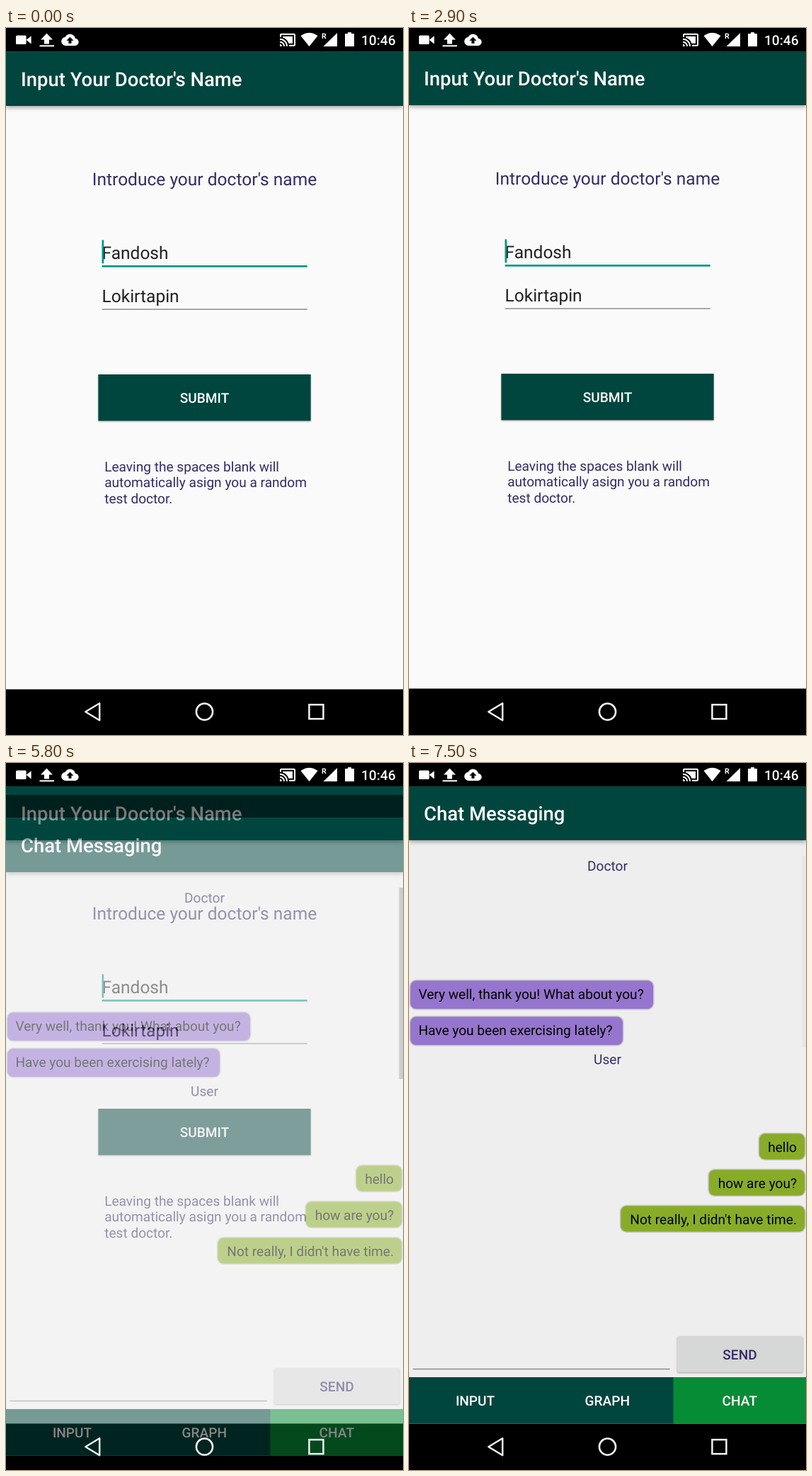
An HTML page for the animation above (8 s loop, 561 by 998 pixels).

```html
<!DOCTYPE html>
<html lang="en">
<head>
<meta charset="utf-8">
<title>Doctor chat</title>
<style>
html, body { margin: 0; height: 100%; overflow: hidden; background: #000; }
svg { display: block; width: 561px; height: 998px; font: 19.1px Roboto, sans-serif; text-rendering: geometricPrecision; }
text { white-space: pre; }
.title { font-size: 27.45px; font-weight: 500; fill: #fff; }
.big { font-size: 24.54px; }
.ink { fill: #352c64; }
.mid { text-anchor: middle; }
.end { text-anchor: end; }
.caps { font-weight: 500; text-anchor: middle; }
.white { fill: #fff; }
.teal { fill: #00453e; }
.bar { filter: drop-shadow(0 2px 3px rgba(0,0,0,.38)); }
.raised { filter: drop-shadow(0 1.5px 1.3px rgba(0,0,0,.32)); }
.pressed { filter: drop-shadow(0 3px 3px rgba(0,0,0,.42)); }
.bubble { stroke: #c6c6c6; stroke-width: 1.5; }
.line { fill: #878787; }
</style>
</head>
<body>
<svg viewBox="0 0 561 998">
  <rect width="561" height="998"/>

  <g id="form">
    <rect width="561" height="998"/>
    <rect y="32.7" width="561" height="899.8" fill="#fafafa"/>
    <rect class="teal bar" y="32.7" width="561" height="76.3"/>
    <text class="title" x="21" y="81">Input Your Doctor's Name</text>
    <text class="big ink mid" x="280.5" y="221">Introduce your doctor's name</text>
    <g class="big" fill="#212121">
      <text x="135.5" y="324.5">Fandosh</text>
      <text x="135.5" y="385.8">Lokirtapin</text>
    </g>
    <rect x="135.7" y="334" width="290" height="2.7" fill="#009688"/>
    <rect class="line" x="135.7" y="395.4" width="290" height="1.4"/>
    <rect id="cursor" x="135.5" y="298.3" width="2.7" height="33" fill="#009688"/>
    <rect id="submit" class="teal raised" x="130.4" y="488" width="300.2" height="65.5"/>
    <text class="caps white" x="280.5" y="528">SUBMIT</text>
    <g class="ink">
      <text x="139.2" y="625">Leaving the spaces blank will</text>
      <text x="139.2" y="647.3">automatically asign you a random</text>
      <text x="139.2" y="669.6">test doctor.</text>
    </g>
  </g>

  <g id="chat">
    <rect width="561" height="998"/>
    <rect y="32.7" width="561" height="899.8" fill="#eee"/>
    <rect class="teal bar" y="32.7" width="561" height="76.3"/>
    <text class="title" x="21" y="81">Chat Messaging</text>
    <text class="ink mid" x="280.5" y="152">Doctor</text>
    <text class="ink mid" x="280.5" y="425">User</text>
    <g class="bubble" fill="#9575cd">
      <rect x="1.2" y="306.5" width="344.6" height="41.3" rx="9"/>
      <rect x="1.2" y="357.5" width="301.6" height="41.3" rx="9"/>
    </g>
    <text x="13.4" y="333">Very well, thank you! What about you?</text>
    <text x="13.4" y="384">Have you been exercising lately?</text>
    <g class="bubble" fill="#88ac28">
      <rect x="494.2" y="522.5" width="65.8" height="37.8" rx="9"/>
      <rect x="423" y="573.5" width="137" height="37.8" rx="9"/>
      <rect x="298.5" y="624.5" width="261.5" height="37.8" rx="9"/>
    </g>
    <g class="end">
      <text x="548" y="549">hello</text>
      <text x="548" y="600">how are you?</text>
      <text x="548" y="651">Not really, I didn't have time.</text>
    </g>
    <rect id="scroll" x="555.5" y="131" width="5.5" height="270" fill-opacity=".31"/>
    <rect class="line" x="5.4" y="854.8" width="363.3" height="1.4"/>
    <rect class="raised" x="379" y="809" width="177.5" height="51" rx="2.5" fill="#d6d7d7"/>
    <text class="caps ink" x="467.5" y="841.5">SEND</text>
    <rect class="teal" y="867" width="374" height="65.5"/>
    <rect x="373.5" y="867" width="187.5" height="65.5" fill="#078c36"/>
    <g class="caps white">
      <text x="93.5" y="907">INPUT</text>
      <text x="280.3" y="907">GRAPH</text>
      <text x="467.3" y="907">CHAT</text>
    </g>
  </g>

  <!-- system bars -->
  <rect width="561" height="32.7"/>
  <g fill="#fff">
    <rect x="14" y="10.6" width="14.6" height="12.4" rx="1.6"/>
    <path d="M35.6 11.2v11.2l-7-5.6z"/>
    <path d="M57.5 7.5l8.5 9h-5v6h-7v-6h-5zM47.5 24.3h20.5v2h-20.5z"/>
    <path transform="translate(78.2 4.5) scale(1.02)" d="M19.35 10.04A7.49 7.49 0 0 0 12 4C9.11 4 6.6 5.64 5.35 8.04A6 6 0 0 0 0 14c0 3.31 2.69 6 6 6h13c2.76 0 5-2.24 5-5 0-2.64-2.05-4.78-4.65-4.96zM14 13v4h-4v-4H7l5-5 5 5z"/>
    <path transform="translate(386 4.7)" d="M1 18v3h3c0-1.66-1.34-3-3-3zm0-4v2c2.76 0 5 2.24 5 5h2c0-3.87-3.13-7-7-7zm18-7H5v1.63c3.96 1.28 7.09 4.41 8.37 8.37H19zM1 10v2c4.97 0 9 4.03 9 9h2c0-6.08-4.93-11-11-11zm20-7H3c-1.1 0-2 .9-2 2v3h2V5h18v14h-7v2h7c1.1 0 2-.9 2-2V5c0-1.1-.9-2-2-2z"/>
    <path d="M428.5 26L416.5 11Q428.5 2.5 440.5 11z"/>
    <path d="M448.5 26H468V7z"/>
    <path d="M479 8h4v-2h5v2h4v18h-13z"/>
    <text x="446" y="15.3" font-size="10.5" font-weight="700">R</text>
    <text class="end" x="550.5" y="24" font-weight="500">10:46</text>
  </g>
  <g fill="none" stroke="#f2f2f2" stroke-width="2.5">
    <path d="M132.2 953.3v23.9L112.3 965.2z" stroke-linejoin="round"/>
    <circle cx="280.5" cy="965.2" r="11.6"/>
    <rect x="428.4" y="955.2" width="20" height="20"/>
  </g>
</svg>
<script>
const LOOP = 8000, STEP = 100, PRESS = 5700, OPEN = 5766, FADE = 7275;
const [form, chat, cursor, submit, scroll] =
  ['form', 'chat', 'cursor', 'submit', 'scroll'].map(id => document.getElementById(id));
const clamp = v => Math.min(1, Math.max(0, v));

// a window slides up and fades in while decelerating
function enter(win, age) {
  const y = 75 * (1 - clamp(age / 350)) ** 5;
  win.setAttribute('transform', `translate(0 ${Math.round(y)})`);
  win.setAttribute('opacity', 1 - (1 - clamp(age / 200)) ** 4);
}

function draw(now) {
  const t = Math.floor(now % LOOP / STEP) * STEP;
  enter(form, t + 202);
  enter(chat, t - OPEN);
  const lit = t >= 4900 || Math.floor((t + 100) / 500) % 2 === 0;
  cursor.setAttribute('opacity', lit ? 1 : 0);
  submit.setAttribute('class', t === PRESS ? 'teal pressed' : 'teal raised');
  scroll.setAttribute('opacity', 1 - clamp((Math.min(t, 7500) - FADE) / 250));
}

const start = performance.now();
function tick() {
  draw(performance.now() - start);
  requestAnimationFrame(tick);
}
tick();
</script>
</body>
</html>
```
